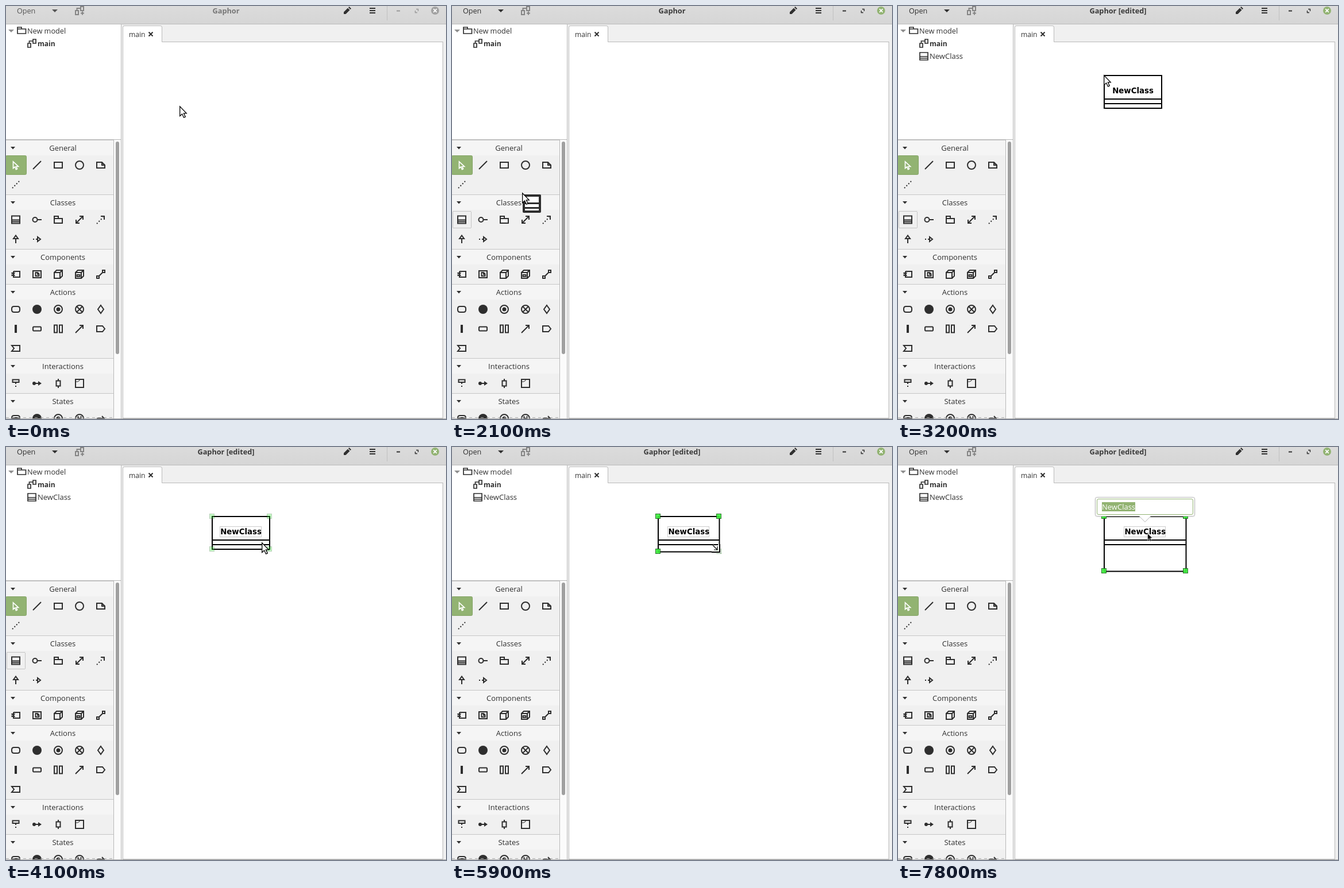
Recreate the animation shown at these times as an HTML page. Size 766 by 719 pixels, loop 8000 ms.

```html
<!DOCTYPE html>
<html lang="en">
<head>
<meta charset="utf-8">
<title>Class diagram editor</title>
<style>
  html, body { margin: 0; width: 100%; height: 100%; overflow: hidden; background: #f0f0f0; }
  svg { display: block; }
  text { font: 13px "Open Sans", "Noto Sans", sans-serif; fill: #303030; }
  .b { font-weight: 700; }
  .mid { text-anchor: middle; }
  .ic { fill: none; stroke: #2e2e2e; stroke-width: 2; }
  .ic .f { fill: #2e2e2e; stroke: none; }
  .ic .t { stroke-width: 1; }
  .ic .d { stroke-dasharray: 2 3; }
  .name { font: 700 13.33px "DejaVu Sans", sans-serif; fill: #000; }
</style>
</head>
<body>
<svg width="766" height="719" viewBox="0 0 766 719">
  <defs>
    <linearGradient id="bar" x2="0" y2="1">
      <stop stop-color="#dbdbdb"/><stop offset="1" stop-color="#d6d6d6"/>
    </linearGradient>
    <g id="sheet"><path d="M-7-6.5H7V6.5H-7z"/><path class="t" d="M-7 .5H7M-7 3.5H7"/></g>
    <g id="nodes"><path d="M-7 0h5v7h-5zM2-7h5v7h-5zM-4.5 0v-4H2"/></g>
  </defs>

  <!-- header bar -->
  <rect width="766" height="31" fill="url(#bar)"/>
  <path d="M0 31.5H766" stroke="#bbb"/>
  <path d="M663.5 0V25" stroke="#c0c0c0"/>
  <text id="open" x="19" y="13" style="font-size:12.6px">Open</text>
  <path id="drop" d="M80 6h10l-5 5z"/>
  <g class="ic" style="stroke:#858585"><use href="#nodes" x="128" y="8"/><path d="M133 9.5v6M130 12.5h6"/></g>
  <text id="title" class="b mid" x="383" y="13" style="font-size:12.7px"></text>
  <path d="M588 14v-3.5l7-7 3.5 3.5-7 7zM596 2.5l1.5-1.5 3.5 3.5-1.5 1.5z" fill="#303030"/>
  <path d="M633 4h10M633 8h10M633 12h10" stroke="#303030" stroke-width="2"/>
  <g id="win" fill="none" stroke-width="2">
    <path d="M680 8.5h6"/>
    <path d="M714 5.5h3.5V9M712.5 8v3.5h3.5" stroke-width="1.4"/>
  </g>
  <circle id="close" cx="747" cy="8" r="7"/>
  <path d="M744.2 5.2l5.6 5.6M749.8 5.2l-5.6 5.6" stroke="#fff" stroke-width="1.8"/>

  <!-- model tree -->
  <rect y="32" width="200" height="200" fill="#fff"/>
  <path d="M4 41h10l-5 5z" fill="#8f8f8f"/>
  <path class="ic" d="M20 37h7v3h7.500v8H20zM20 40h7" style="stroke-width:1.7"/>
  <text x="37" y="48" style="font-size:12.7px">New model</text>
  <g class="ic" style="stroke-width:1.7"><use href="#nodes" x="45" y="65"/></g>
  <text class="b" x="55" y="70" style="font-size:12px">main</text>
  <g id="leaf">
    <g class="ic" style="stroke-width:1.7"><use href="#sheet" x="45" y="87.500"/></g>
    <text x="55" y="92">NewClass</text>
  </g>

  <!-- toolbox -->
  <rect x="188" y="233" width="12" height="485" fill="#fbfbfb"/>
  <rect x="191" y="236" width="6" height="370" rx="3" fill="#a0a0a0"/>
  <g id="tools"></g>
  <path d="M187.500 233V718M200.500 32V718" stroke="#b9b9b9"/>
  <path d="M0 232.500H200" stroke="#b9b9b9"/>
  <path d="M0 716.500H187" stroke="#aaa" stroke-dasharray="5 5"/>

  <!-- page -->
  <rect x="203.500" y="62.500" width="557" height="655" fill="#fff" stroke="#b9b9b9"/>
  <path d="M203.500 63V37q0-2.500 2.500-2.500h63q2.500 0 2.500 2.500V62.500" fill="#fff" stroke="#b9b9b9"/>
  <path d="M204 62.500H271" stroke="#fff"/>
  <text x="214" y="54" style="font-size:12.1px">main</text>
  <path d="M248.500 45.500l7 7M255.500 45.500l-7 7" stroke="#303030" stroke-width="2"/>
  <path d="M0 718.500H766" stroke="#a8a8a8"/>

  <g id="item">
    <path id="box" fill="none" stroke="#000" stroke-width="2"/>
    <rect id="edit" y="138.500" width="72" height="18" fill="none" stroke="#ccc"/>
    <text id="name" class="name mid" y="152">NewClass</text>
    <g id="grips" fill="#3cf03c" stroke="#146414"></g>
  </g>

  <g id="pop">
    <rect x="342" y="87" width="176" height="36" rx="5" fill="#000" opacity=".04"/>
    <path d="M346.500 87.500h167q3 0 3 3v27q0 3-3 3H440l-10 10-10-10h-73.500q-3 0-3-3v-27q0-3 3-3z" fill="#fff" stroke="#b4b4b4"/>
    <rect x="346.500" y="90.500" width="167" height="27" rx="2.500" fill="#fff" stroke="#92b372"/>
    <rect x="355" y="96" width="58" height="16" fill="#92b372"/>
    <text x="355" y="109" style="fill:#fff">NewClass</text>
  </g>

  <g id="drag" fill="#fff" stroke="#2e2e2e">
    <path d="M3 4h28v28H3z" stroke-width="4" stroke-linejoin="round"/>
    <path d="M3 17.500h28M3 25.500h28" stroke-width="3"/>
  </g>
  <path id="arrow" d="M.7.9V17.500L4.600 14l3 6.200 2.700-1.200-2.900-6.100h4.800z" fill="#fff" stroke="#000" stroke-width="1.300"/>
  <path id="dark" d="M.5.500V12L3.300 9.500 5.400 14.300 7.500 13.400 5.400 8.700H9z" fill="#000" stroke="#fff" stroke-width=".6"/>
  <g id="size" fill="none">
    <path d="M0-14V0H-14" stroke="#fff" stroke-width="5"/>
    <path d="M0-14V0H-14" stroke="#000" stroke-width="2"/>
    <path d="M-12-12L-4-4M-10-4H-4V-10" stroke="#fff" stroke-width="3"/>
    <path d="M-12-12L-4-4M-10-4H-4V-10" stroke="#000" stroke-width="1.200"/>
  </g>
</svg>
<script>
const $ = id => document.getElementById(id);
const p = (d, c = "") => `<path class="${c}" d="${d}"/>`;
const disc = (r, c = "", x = 0) => `<circle cx="${x}" r="${r}" class="${c}"/>`;
const cube = p("M-7-3H3V7H-7zM-7-3L-3-7H7V3L3 7M3-3L7-7");
const pill = p("M-3-5H3q4 0 4 4V1q0 4-4 4H-3q-4 0-4-4V-1q0-4 4-4z");
const head = "M0-6H6V0";

// each section: top line, title, icon rows
const sections = [
  [233, "General", [[
    `<g style="stroke:#fff;stroke-width:1.7">${p("M-4.500-6V5.500L-1.500 3 .5 7.500 2.500 6.500 .7 2.500H4.500z")}</g>`,
    p("M-7 7L7-7"), p("M-7-5H7V5H-7z"), disc(7), p("M-7-5H2L7 0V5H-7zM2-5V0H7")],
    [p("M-6 6L7-7", "d")]]],
  [328, "Classes", [[
    '<use href="#sheet"/>', disc(4, "", -3.5) + p("M1 0H8"), p("M-7-6H0V-2H7V6H-7zM-7-2H0"),
    p("M-6 6L6-6" + head + "M0 6H-6V0"), p("M-7 7L4-4", "d") + p(head)],
    [p("M0 7V-1M-4-1L0-6.500L4-1z"), p("M-7 0H1", "d") + p("M1-4L6 0L1 4z")]]],
  [423, "Components", [[
    p("M-4-5H7V5H-4V-5") + p("M-8-2.500H-1M-8 2.500H-1M-8 0H-2", "t") + p("M-7-3h5v2h-5zM-7 1h5v2h-5z", "f"),
    p("M-7-6H7V6H-7z") + p("M-2.500-3H1L3.500-.5V3H-2.500zM1-3V0H4"), cube,
    cube + p("M-4.500 1H.5V4H-4.500z"), p("M-7 3h4v4h-4zM3-7h4v4H3zM-3 3L3-3")]]],
  [484, "Actions", [[
    pill, disc(8, "f"), disc(7) + disc(3.5, "f"), disc(7) + p("M-5-5L5 5M5-5L-5 5"), p("M0-7L5 0L0 7L-5 0z")],
    [p("M-2-7H2V7H-2z", "f"), p("M-6-3.500H6L7-2.500V2.500L6 3.500H-6L-7 2.500V-2.500z"),
    p("M-7-6.500H-2V6.500H-7zM2-6.500H7V6.500H2z"), p("M-7 7L6-6M0-6H6V0"), p("M-7-5H3L7 0L3 5H-7z")],
    [p("M-7-5H7V5H-7L-3 0z")]]],
  [613, "Interactions", [[
    p("M-5.500-6.500H5.500V-2H-5.500z") + p("M0-1V8", "d"),
    disc(3, "f", -5) + p("M-5 0H4") + p("M2-4L8 0L2 4z", "f"),
    p("M-3.500-4.500H3.500V4.500H-3.500zM0-8V-5M0 5V8"),
    p("M-7-7H7V7H-7z") + p("M-7-3H-3L0-5V-7", "t")]]],
  [674, "States", [[
    pill + p("M-7-1H7"), disc(8, "f"), disc(7) + disc(3.5, "f"),
    disc(7) + p("M-2.500-4V4M2.500-4V4M-2.500 0H2.500"), p("M-7 0H6M2-4L6 0L2 4")]]]
];

let html = "";
for (const [y, label, rows] of sections) {
  html += `<rect y="${y}" width="187" height="27" fill="#f5f5f5"/>
    <path d="M0 ${y + .5}H187" stroke="#c6c6c6"/><path d="M8 ${y + 12}h8l-4 4.500z" fill="#303030"/>
    <text class="mid" x="99" y="${y + 18.5}">${label}</text>`;
  if (label == "General")
    html += '<rect x="-.5" y="260.500" width="36" height="33" rx="2" fill="#92b372" stroke="#84a466"/>';
  if (label == "Classes")
    html += `<rect id="hover" x="-.5" y="355.500" width="36" height="33" rx="2" fill="#fbfbfb" stroke="#d2d2d2"/>
      <rect id="focus" x="1.500" y="357.500" width="32" height="29" rx="1" fill="none" stroke="#999" stroke-dasharray="1 1"/>`;
  rows.forEach((row, r) => row.forEach((icon, i) => {
    html += `<g class="ic" transform="translate(${17 + 37 * i} ${y + 44 + 34 * r})">${icon}</g>`;
  }));
}
$("tools").innerHTML = html;

// [ms, x, y]; positions between keys move in 100 ms ticks
const pointer = [
  [0, 302, 174], [300, 302, 174], [800, 139, 297], [900, 139, 297], [1400, 26, 367], [1500, 24, 369],
  [1600, 24, 369], [1700, 23, 370], [1900, 23, 370], [2400, 285, 250], [2800, 285, 250], [2900, 402, 123],
  [3000, 402, 123], [3100, 358, 120], [3500, 358, 120], [3900, 436, 159], [4000, 436, 159], [4100, 445, 166],
  [4400, 445, 166], [4600, 455, 174], [4800, 455, 174], [5000, 454, 175], [5200, 454, 175], [5400, 456, 177],
  [6900, 502, 217], [7000, 462, 178], [7100, 435, 151], [7200, 435, 151], [7300, 434, 150]
];
const corner = [
  [0, 459, 178], [5800, 459, 178], [5900, 465.5, 182.5], [6000, 470.5, 186.5], [6100, 470.5, 186.5],
  [6200, 476.5, 192.5], [6300, 476.5, 192.5], [6400, 488.5, 202.5], [6500, 488.5, 202.5],
  [6600, 498.5, 214.5], [6700, 501.5, 216.5]
];

function at(keys, t) {
  const i = keys.findIndex(k => k[0] > t);
  if (i < 0) return keys[keys.length - 1].slice(1);
  const [a, x, y] = keys[i - 1], [b, u, v] = keys[i];
  let k = (t - a) / (b - a);
  k = (k + k * k * (3 - 2 * k)) / 2;
  return [x + (u - x) * k, y + (v - y) * k].map(Math.round);
}

const show = (id, on) => $(id).style.display = on ? "" : "none";
const move = (id, x, y) => $(id).setAttribute("transform", `translate(${x} ${y})`);

function draw(ms) {
  const t = Math.floor(ms / 100) * 100;
  const [x, y] = at(pointer, t);
  const [cx, cy] = at(corner, t).map((v, i) => corner.find(k => k[0] == t)?.[i + 1] ?? v);
  const active = t >= 2000, made = t >= 3200, picked = t >= 5600;
  const sizing = picked && t < 7000;

  $("title").textContent = made ? "Gaphor [edited]" : "Gaphor";
  $("title").style.fill = active ? "#3a3a3a" : "#777";
  $("open").style.fill = active ? "#303030" : "#555";
  $("drop").style.fill = active ? "#303030" : "#555";
  $("win").style.stroke = active ? "#303030" : "#999";
  $("close").style.fill = active ? "#92b372" : "#a2a2a2";
  show("leaf", made);
  show("hover", t >= 1300 && t < 2000);
  show("focus", active && !picked);

  show("item", made);
  const mid = (359 + cx) / 2;
  $("box").setAttribute("d", `M359 121H${cx}V${cy}H359zM359 162H${cx}M359 170H${cx}`);
  $("name").setAttribute("x", mid);
  $("edit").setAttribute("x", Math.floor(mid - 36) - .5);
  show("edit", t >= 3600);
  show("grips", t >= 3600);
  $("grips").style.opacity = picked ? .9 : .3;
  $("grips").innerHTML = [[359, 121], [cx, 121], [359, cy], [cx, cy]].map(([gx, gy]) =>
    `<rect x="${Math.floor(gx - 4) - .5}" y="${Math.floor(gy - 4) - .5}" width="8" height="8"/>`).join("");

  show("pop", t >= 7700);
  $("pop").style.opacity = t < 7800 ? .5 : 1;

  show("drag", active && !made);
  move("drag", x, y + 1);
  show("arrow", !picked);
  move("arrow", x, y);
  show("dark", t >= 7000);
  move("dark", x, y);
  show("size", sizing);
  move("size", Math.floor(cx) + 1, Math.floor(cy) + 1);
}

const start = performance.now();
function tick(now) {
  draw(Math.max(0, now - start) % 8000);
  requestAnimationFrame(tick);
}
draw(0);
requestAnimationFrame(tick);
</script>
</body>
</html>
```
